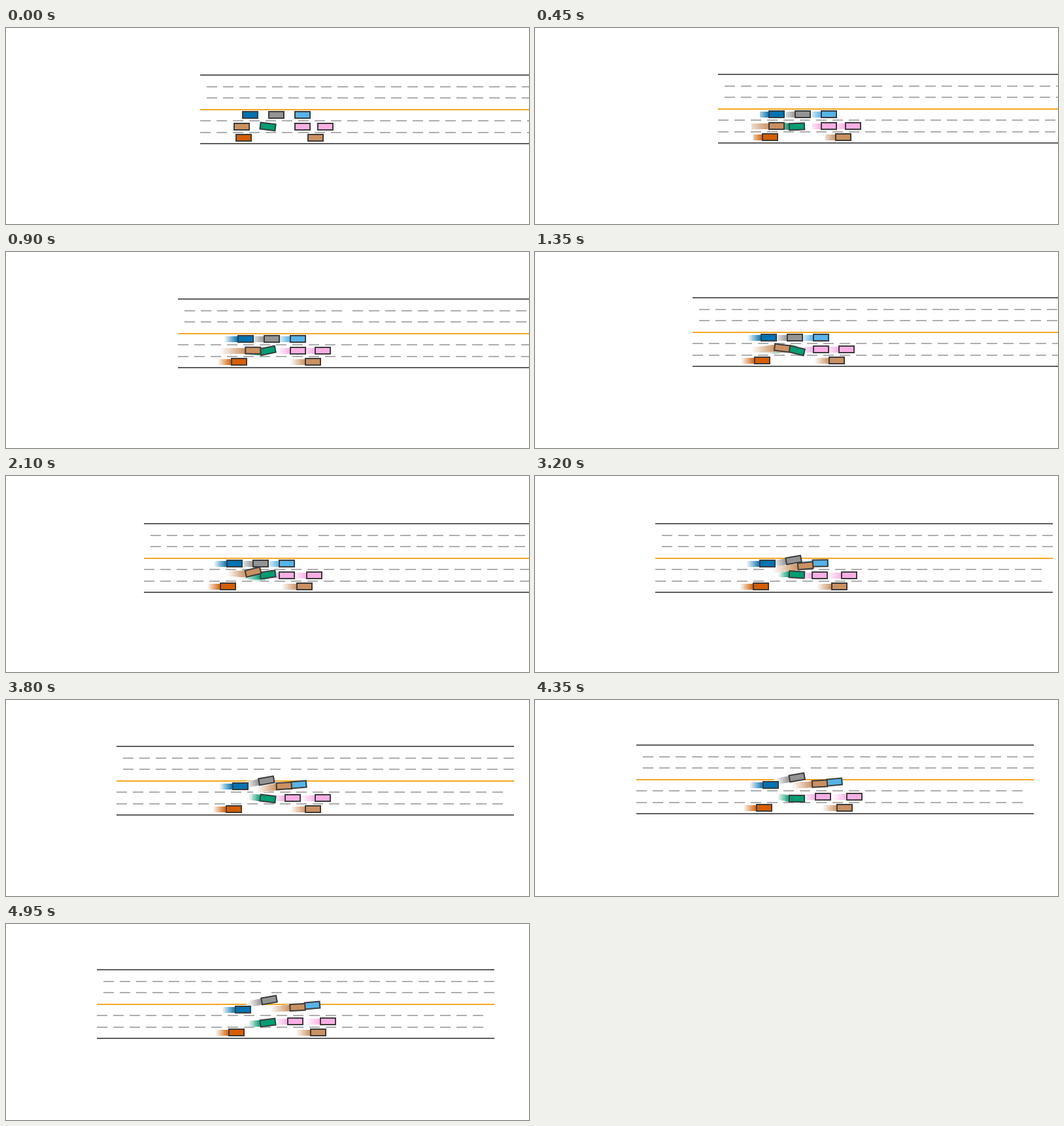
A matplotlib script for the animation above (5000 ms loop, 800x300 px).

```python
import numpy as np
import matplotlib.pyplot as plt
from matplotlib.animation import FuncAnimation
from matplotlib.collections import PolyCollection
from matplotlib.colors import to_rgb

W, H, DPI = 800, 300, 100
FRAMES, INTERVAL = 100, 50
ROAD_LENGTH, LANE = 608, 17.5
TRAIL = 15
PX = 72 / DPI  # one pixel in points

EDGE, DASH, CENTRE, BORDER = "#5f5f5f", "#aeaeae", "#f5a623", "#3c3c3c"
BLUE, GREEN, ORANGE, BROWN = "#0173b2", "#029e73", "#d55e00", "#ca9161"
PINK, GREY, SKY = "#fbafe4", "#949494", "#56b4e9"
LANES = 61, 79, 96
SLOW, FAST, RUSH = 1.485, 1.637, 2.85
BUMPER = 22.5  # gap between the centres of touching cars


def track(*keys):
    """Straight motion between (frame, value) keys."""
    times, values = zip(*keys)
    return lambda f: float(np.interp(f, times, values))


def swing(*keys):
    """Eased motion between (frame, value) keys."""
    times, values = zip(*keys)
    steps = track(*((t, i) for i, t in enumerate(times)))

    def value(f):
        i, t = divmod(steps(f), 1)
        i = int(i)
        end = values[min(i + 1, len(values) - 1)]
        return values[i] + (end - values[i]) * (1 - np.cos(np.pi * t)) / 2
    return value


def since(f, start):
    return max(0, f - start)


# Road offset on the stage: the camera follows the green car.
road_x = track((0, 297), (18, 263), (27, 241), (42, 211), (53, 197),
               (76, 169), (99, 139))
road_y = track((0, 72), (8, 71), (22, 73), (29, 69), (47, 74), (60, 74),
               (84, 69), (99, 70))
green_angle = swing((0, 7), (18, -12), (27, 14), (42, -8), (53, 0), (76, 7),
                    (99, -7))

brown_y = track((17, 79), (42, 74), (53, 68), (76, 60.5), (99, 57.5))
brown_angle = swing((16, 0), (27, 7), (42, -14), (53, -7), (76, -3))
grey_angle = swing((43, 0), (57, -10))
sky_angle = swing((61, 0), (72, -5))


def cruise(start, speed, lane):
    return lambda f: (start + speed * f, LANES[lane], 0)


def green_pose(f):
    return 400.5 - round(road_x(f)), 150.9 - round(road_y(f)), green_angle(f)


def sky_pose(f):
    x = 156.5 + SLOW * f + 0.72 * since(f, 63)
    return x, LANES[0] - 0.17 * since(f, 61), sky_angle(f)


def grey_pose(f):
    return 116.5 + SLOW * f, LANES[0] - 0.26 * since(f, 43), grey_angle(f)


def brown_pose(f):
    """Runs into the green car, slips past it, then pushes the sky one."""
    free = 42
    held = min(f, free)
    x = min(63.5 + RUSH * held, green_pose(held)[0] - BUMPER)
    x = min(x + RUSH * since(f, free), sky_pose(f)[0] - BUMPER)
    return x, brown_y(f), brown_angle(f)


# Back to front.
CARS = [
    (GREEN, green_pose),
    (SKY, sky_pose),
    (BLUE, cruise(76.5, SLOW, 0)),
    (PINK, cruise(156.5, SLOW, 1)),
    (PINK, cruise(191.55, FAST, 1)),
    (ORANGE, cruise(66.5, SLOW, 2)),
    (BROWN, cruise(176.55, FAST, 2)),
    (BROWN, brown_pose),
    (GREY, grey_pose),
]


def box(pose, length, width, left, top):
    x, y, angle = pose
    if angle == 0:
        x, y = np.floor(x) + 0.5, round(y)
    c, s = np.cos(np.radians(angle)), np.sin(np.radians(angle))
    corners = np.array([(-1, -1), (1, -1), (1, 1), (-1, 1)])
    corners = corners * (length / 2, width / 2)
    return corners @ np.array([(c, s), (-s, c)]) + (left + x, top + y)


def bar(x0, x1, y):
    return np.array([(x0, y - 1), (x1, y - 1), (x1, y + 1), (x0, y + 1)])


def road_marks():
    """Line markings in road coordinates, with their colours."""
    near = [25 * k for k in range(24)]
    far = [10 + x + 7 * (x >= 250) for x in near]
    solid = {0: EDGE, 3: CENTRE, 6: EDGE}
    marks = []
    for line in range(7):
        y = int(line * LANE + 0.5)
        if line in solid:
            marks.append((bar(0, ROAD_LENGTH, y), solid[line]))
        else:
            marks += [(bar(x, x + 16, y), DASH)
                      for x in (far if line < 3 else near)]
    return zip(*marks)


def fade(color, age):
    weight = max(0, 1 - age / (TRAIL - 1))
    return 1 - weight * (1 - np.array(to_rgb(color)))


fig = plt.figure(figsize=(W / DPI, H / DPI), dpi=DPI, facecolor="white")
ax = fig.add_axes([0, 0, 1, 1])
ax.set_xlim(0, W)
ax.set_ylim(H, 0)
ax.axis("off")

mark_shapes, mark_colors = road_marks()
marks = PolyCollection([], facecolors=mark_colors, linewidths=0,
                       antialiaseds=False)
trails = PolyCollection([], linewidths=0)
bodies = PolyCollection([], facecolors=[color for color, _ in CARS],
                        edgecolors=BORDER, linewidths=2 * PX,
                        joinstyle="miter")
for z, layer in enumerate((marks, trails, bodies), 1):
    layer.set_zorder(z)
    ax.add_collection(layer, autolim=False)


def draw(f):
    left, top = round(road_x(f)), round(road_y(f))
    marks.set_verts([shape + (left, top) for shape in mark_shapes])

    shapes, colors = [], []
    for color, pose in CARS:
        for age in range(min(f, TRAIL), -1, -1):
            shapes.append(box(pose(f - age), 25, 9, left, top + 0.5))
            colors.append(fade(color, age))
    trails.set_verts(shapes)
    trails.set_facecolor(colors)

    bodies.set_verts([box(pose(f), 23, 10, left, top) for _, pose in CARS])
    return marks, trails, bodies


anim = FuncAnimation(fig, draw, frames=FRAMES, interval=INTERVAL,
                     repeat=True, repeat_delay=0, blit=False)
plt.show()
```
